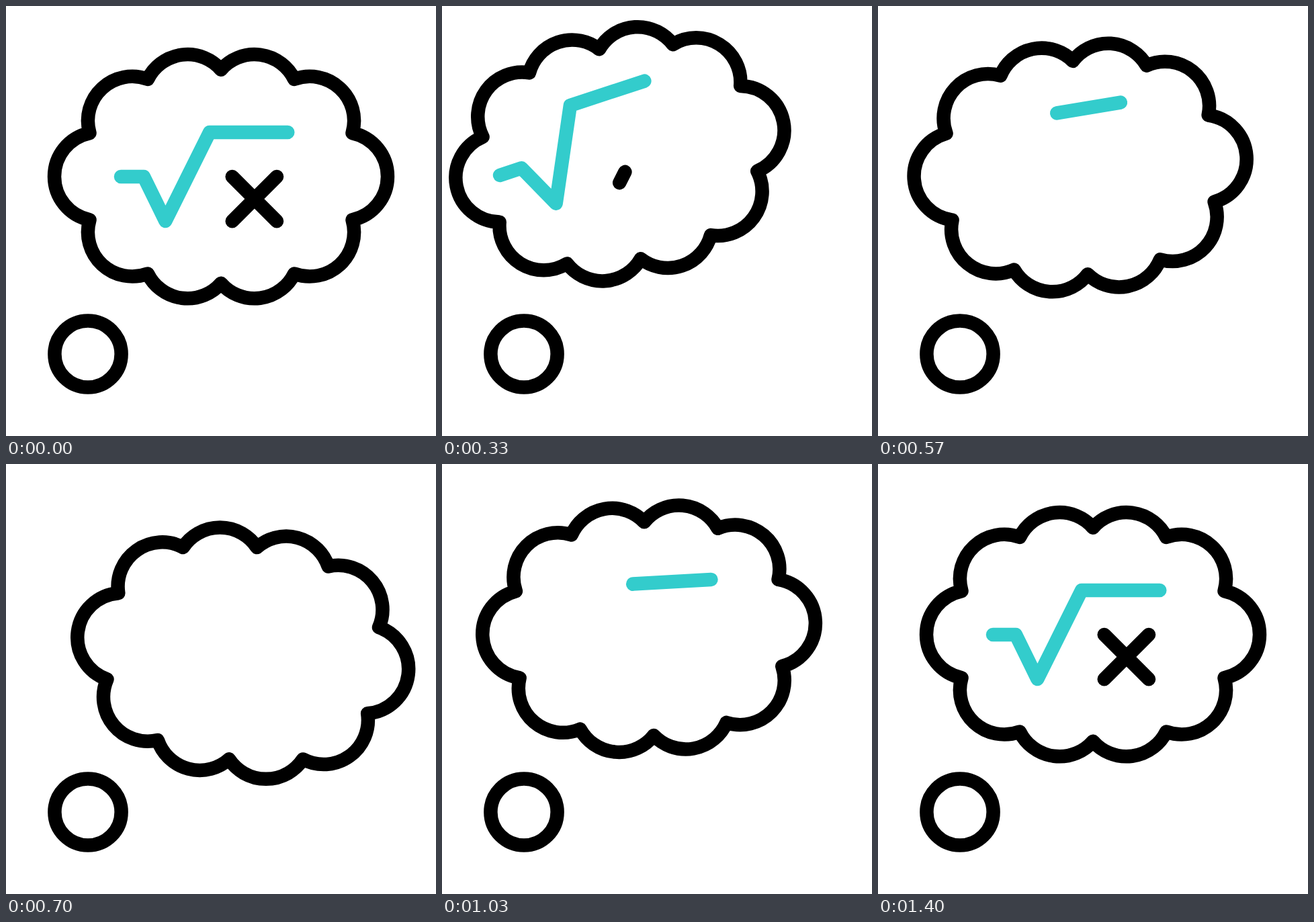
An HTML page that plays this animation: 640 px wide and 640 px high, repeating every 1670 ms.

```html
<!DOCTYPE html>
<html lang="en">
<head>
<meta charset="utf-8">
<title>Thought bubble</title>
<style>
  html, body { margin: 0; width: 100%; height: 100%; overflow: hidden; background: #fff; }
  svg { display: block; width: 100vw; height: 100vh; }
</style>
</head>
<body>
<svg viewBox="0 0 640 640" fill="none" stroke="#000" stroke-width="20.5" stroke-linecap="round" stroke-linejoin="round">
  <path id="cloud"/>
  <g id="formula">
    <path id="root" stroke="#33cccc"/>
    <path id="cross"/>
  </g>
  <circle cx="122" cy="518" r="49.6"/>
</svg>
<script>
const LOOP = 1670, FPS = 30, LAST = 42;
const PIVOT = "122 518";
const $ = id => document.getElementById(id);

// Cubic ease-in-out with handles at .42 and .58
function ease(x) {
  if (x <= 0) return 0;
  if (x >= 1) return 1;
  let lo = 0, hi = 1;
  for (let i = 0; i < 24; i++) {
    const t = (lo + hi) / 2, u = 1 - t;
    if (3 * u * u * t * 0.42 + 3 * u * t * t * 0.58 + t * t * t < x) lo = t;
    else hi = t;
  }
  return lo * lo * (3 - 2 * lo);
}

const ramp = (n, a, b) => ease((n - a) / (b - a));

// Swing keys: tick and angle in degrees
const beats = [0, 12.65, 22.5, 28.4, 35.3, 42];
const cloudSwing = [0, -12.3, 8.45, -4.45, 2, 0];
const formulaSwing = [0, -20, 6.3, -5.2, 1.6, 0];

function swing(n, angles) {
  for (let i = 1; i < beats.length; i++) {
    if (n <= beats[i]) {
      const k = ramp(n, beats[i - 1], beats[i]);
      return angles[i - 1] + (angles[i] - angles[i - 1]) * k;
    }
  }
  return 0;
}

const rootLines = [[[171, 254], [205, 254], [237.3, 320], [303, 188], [419.3, 188]]];
const crossLines = [[[403, 320.3], [336.7, 254]], [[403, 254], [336.7, 320.3]]];

const dist = (p, q) => Math.hypot(q[0] - p[0], q[1] - p[1]);

function lengthOf(lines) {
  let sum = 0;
  for (const pts of lines)
    for (let i = 1; i < pts.length; i++) sum += dist(pts[i - 1], pts[i]);
  return sum;
}

// Path data with the leading share of the length removed
function trim(lines, share) {
  if (share > 0.999) return "";
  let skip = share * lengthOf(lines), d = "";
  for (const pts of lines) {
    let open = false;
    for (let i = 1; i < pts.length; i++) {
      const p = pts[i - 1], q = pts[i], len = dist(p, q);
      if (skip >= len) { skip -= len; continue; }
      if (!open) {
        const k = skip / len;
        d += `M${p[0] + (q[0] - p[0]) * k} ${p[1] + (q[1] - p[1]) * k}`;
        open = true;
        skip = 0;
      }
      d += `L${q[0]} ${q[1]}`;
    }
  }
  return d;
}

// Ten lobes, mirrored from the notches of one quarter
function cloudPath() {
  const cx = 320, cy = 253.7;
  const half = [[195.5, 64.6], [109, 144.7], [0, 159], [-109, 144.7], [-195.5, 64.6]];
  const notches = [
    ...half.map(([x, y]) => [cx - x, cy - y]),
    ...half.map(([x, y]) => [cx + x, cy + y])
  ];
  const [first, ...rest] = notches;
  return `M${first}` + [...rest, first].map(p => `A66 66 0 0 1 ${p}`).join("") + "Z";
}

function draw(ms) {
  const n = Math.min(LAST, Math.floor((ms + 5) * FPS / 1000));
  $("cloud").setAttribute("transform", `rotate(${swing(n, cloudSwing)} ${PIVOT})`);
  $("formula").setAttribute("transform", `rotate(${swing(n, formulaSwing)} ${PIVOT})`);
  $("cross").setAttribute("d", trim(crossLines, ramp(n, 2.8, 12) - ramp(n, 34, 42)));
  $("root").setAttribute("d", trim(rootLines, ramp(n, 11.3, 20.1) - ramp(n, 27.5, 36.5)));
}

$("cloud").setAttribute("d", cloudPath());
const start = performance.now();
function tick() {
  draw((performance.now() - start) % LOOP);
  requestAnimationFrame(tick);
}
tick();
</script>
</body>
</html>
```
